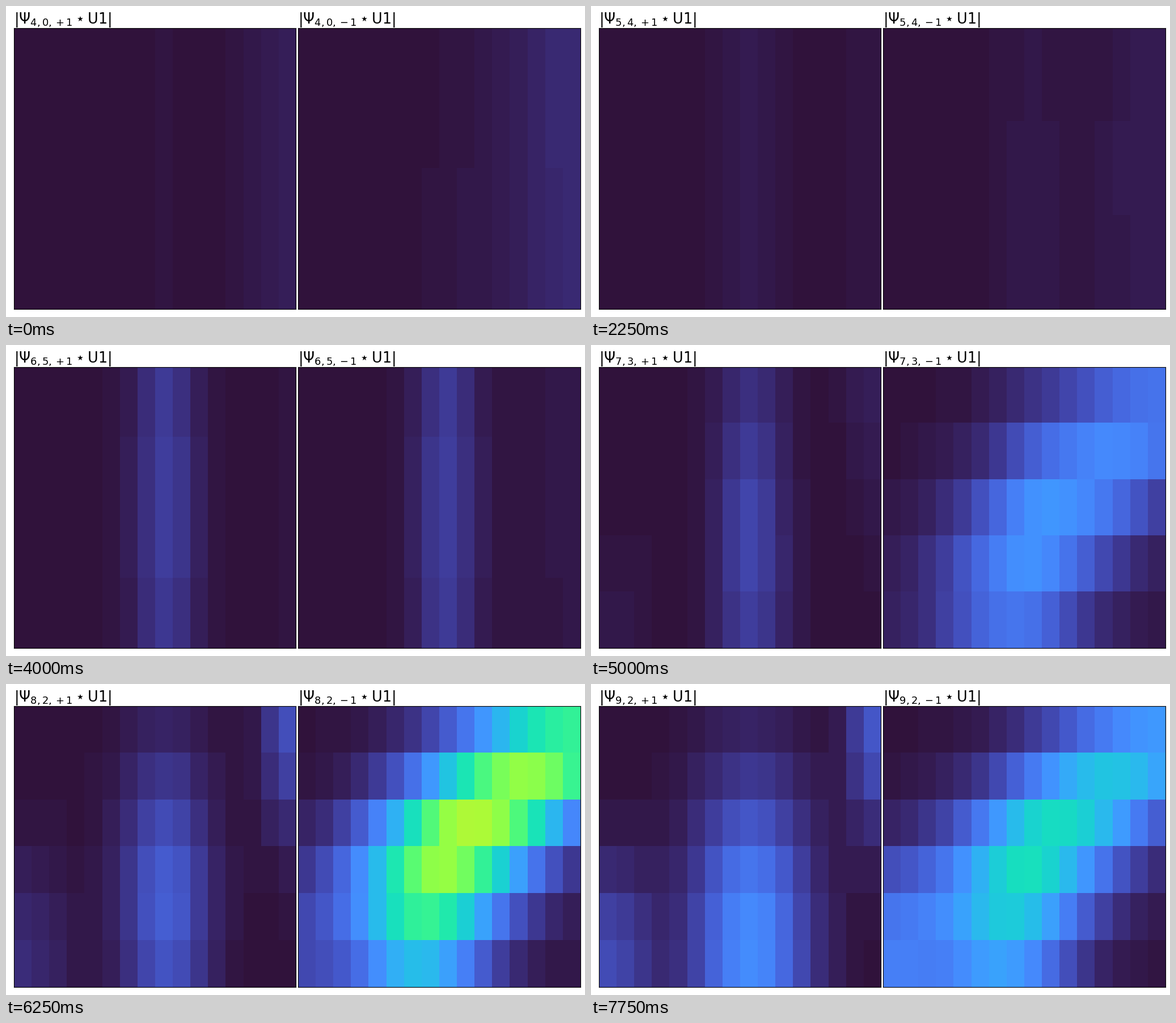
Recreate the animation shown at these times as a matplotlib script. Size 1021 px wide and 549 px high, loop 8000 ms.

```python
import numpy as np
import matplotlib
import matplotlib.pyplot as plt
from matplotlib.animation import FuncAnimation

W, H, DPI = 1021, 549, 64
PX = 72 / DPI                     # points per pixel
COLS = np.arange(16)
TURBO = matplotlib.colormaps["turbo"]

# (n, k) index pairs, shown one after the other
STEPS = [(n, k) for n in range(4, 10) for k in range(min(n, 5) + 1)][:32]


def bump(x, mid, rise, fall=None):
    """Gaussian with separate widths on either side of its centre."""
    d = x - mid
    width = rise if fall is None else np.where(d < 0, rise, fall)
    return np.exp(-(d / width) ** 2)


def sigmoid(x):
    return 1 / (1 + np.exp(-x))


def magnitudes(n, k):
    """Colour levels of both panels, rows by columns."""
    r = np.arange(min(n - 2, 6))[:, None]
    late = max(n - 6, 0) ** 2     # growth of the slow wavelets
    early = np.exp(4 - n)         # fade of the fast ones

    # upright stripe, tallest in the lower rows
    peak = .6 + (11.5 + 3.3 * late) * (.9 + .1 * k) * sigmoid(4 * (n - 5.4))
    centre = .9 * (n - 6) + 2.2 - .15 * k
    stripe = peak * bump(r, centre, 1.6 + .5 * k + .2 * max(n - 6, 0))

    # energy at the upper right and lower left edges
    corner = 31 * sigmoid(3 * (n - 7.4)) * np.exp(-(k / 4) ** 2)
    right = corner * bump(r, 0, 2.05) + 4 * early
    left = 2.25 * late * sigmoid(1.8 * (r - 3.2))

    # slanted band, strongest near n = 8 and k = 1
    gain = 168 / (1 + abs(n - 7.7) ** 3.5 / 4) * bump(k, 1.2, 1.64)
    band = gain * bump(r, .5 * (n + k - 6), 3.5)
    mid = 5.9 + 9.2 * np.exp(-.36 * r ** 1.4) + .4 * max(7 - n, 0)

    up = (stripe * bump(COLS, 8.1, 1.75 + .15 * late)
          + right * bump(COLS, 15, 1.3 * (1 + early))
          + left * bump(COLS, 0, 2.6))
    down = (band * bump(COLS, mid, 6.2 - .6 * r, 6 - .4 * r)
            + stripe * (k / 5) ** 3 * bump(COLS, 7.9, 1.75)
            + (1 + 4 * early) * bump(COLS, 15, 3)
            + 2 * left * bump(COLS, 0, 4))
    return up, down


def label(n, k, sign):
    gap = r"\hspace{0.2}"
    return (rf"$|\Psi_{{{n}, {k}, {gap}{{{sign}}}{gap}1}}"
            r" \star \mathrm{U1}|$")


fig = plt.figure(figsize=(W / DPI, H / DPI), dpi=DPI, facecolor="white")
TOP, BOTTOM, SIZE = 39.4, 535.4, 497.4
panels = []
for x, sign in ((14, "+"), (515.45, "-")):
    ax = fig.add_axes([x / W, 1 - BOTTOM / H, SIZE / W, (BOTTOM - TOP) / H])
    ax.set(xticks=[], yticks=[])
    for spine in ax.spines.values():
        spine.set_linewidth(1.11 * PX)
    image = ax.imshow(np.zeros((2, 16, 4)), extent=(0, 1, 0, 1),
                      aspect="auto", interpolation="nearest")
    title = fig.text(x / W, 1 - (TOP - 8.33) / H, "", fontsize=25.5 * PX,
                     family="DejaVu Sans", ha="left", va="baseline")
    panels.append((image, title, sign))


def draw(i):
    n, k = STEPS[i]
    for (image, title, sign), grid in zip(panels, magnitudes(n, k)):
        image.set_data(TURBO(np.clip(np.rint(grid), 0, 255).astype(int)))
        title.set_text(label(n, k, sign))
    return [artist for panel in panels for artist in panel[:2]]


anim = FuncAnimation(fig, draw, frames=len(STEPS), interval=250,
                     repeat=True, repeat_delay=0, blit=False)
plt.show()
```
